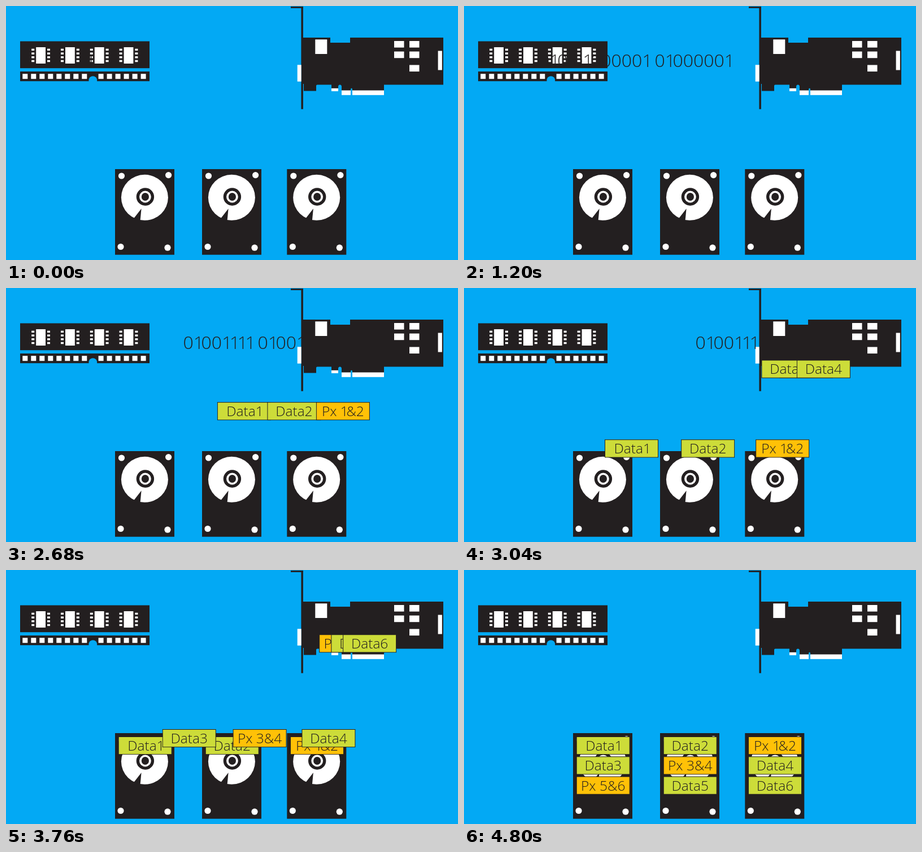
Write an HTML page that moves like this. It is 800 px wide and 450 px high and loops after 10 s.

```html
<!DOCTYPE html>
<html lang="en">
<head>
<meta charset="utf-8">
<title>Parity across three disks</title>
<style>
  html, body { margin: 0; width: 100%; height: 100%; overflow: hidden; background: #03a9f4; }
  svg { display: block; width: 100vw; height: 100vh; }
  .dark { fill: #231f20; }
  .white { fill: #fff; }
  .blue { fill: #03a9f4; }
  text { font-family: "Open Sans", "Noto Sans", sans-serif; font-weight: 300; font-variant-numeric: tabular-nums; fill: #231f20; }
  .one { letter-spacing: -.14em; }
  .bits { font-size: 32px; animation: stream 10s linear infinite; }
  .block { animation: 10s linear infinite; }
  .block rect { fill: #cddc39; stroke: #231f20; stroke-width: 1; }
  .block.parity rect { fill: #ffc107; }
  .block text { font-size: 24.5px; text-anchor: middle; }
  .row0 { animation-name: drop0; }
  .row1 { animation-name: drop1; }
  .row2 { animation-name: drop2; }

  @keyframes stream {
    0% { transform: translate(-401.5px, 108px); }
    35%, 100% { transform: translate(531.8px, 108px); }
  }
  @keyframes drop0 {
    0%, 20.35% { visibility: hidden; transform: var(--from); }
    20.36% { visibility: visible; transform: var(--from); }
    31.86%, 100% { visibility: visible; transform: var(--to); }
  }
  @keyframes drop1 {
    0%, 28.35% { visibility: hidden; transform: var(--from); }
    28.36% { visibility: visible; transform: var(--from); }
    39.86%, 100% { visibility: visible; transform: var(--to); }
  }
  @keyframes drop2 {
    0%, 36.35% { visibility: hidden; transform: var(--from); }
    36.36% { visibility: visible; transform: var(--from); }
    47.86%, 100% { visibility: visible; transform: var(--to); }
  }
</style>
</head>
<body>
<svg id="stage" viewBox="0 0 800 450"></svg>
<script>
const rect = (x, y, w, h, cls = 'white') =>
  `<rect class="${cls}" x="${x}" y="${y}" width="${w}" height="${h}"/>`;
const dot = (x, y, rx, cls = 'white', ry = rx) =>
  `<ellipse class="${cls}" cx="${x}" cy="${y}" rx="${rx}" ry="${ry}"/>`;
const repeat = (n, make) => Array.from({ length: n }, (_, i) => make(i)).join('');
// The digit 1 is set narrower than the other figures
const figures = s => s.replace(/1/g, '<tspan class="one">1</tspan>');

function memory() {
  const chip = i => {
    const x = 53.2 + i * 51.8;
    return rect(x, 73, 16.8, 29) + repeat(4, r => {
      const y = 75.7 + r * 6.7;
      return rect(x - 8, y, 5, 3.4) + rect(x + 19.8, y, 5, 3.4);
    });
  };
  return rect(25, 62.5, 229, 47.7, 'dark') + rect(25, 116, 229, 17.2, 'dark') +
    repeat(4, chip) +
    repeat(8, i => rect(29.3 + i * 15, 120.2, 9, 9)) +
    repeat(6, i => rect(163.6 + i * 15, 120.2, 9, 9)) +
    `<path class="blue" d="M146.5 134v-2.5a7.3 7.3 0 0 1 14.6 0v2.5z"/>`;
}

function card() {
  const body = `M525 56H574V65H609V56H774V139.5H669V150H613V147Q611.5 144 610 147V150H594V143
    Q594 139.5 591 139.5Q588 139.5 588 143V147H576V139.5H551Q549 139.5 549 141.5V150.5H527V138H525Z`;
  return rect(504, 1, 22, 2.8, 'dark') + rect(522.4, 1, 3.5, 181.7, 'dark') +
    `<path class="dark" d="${body}"/>` +
    rect(515.7, 104.3, 6.9, 29.5) + rect(547.3, 59.3, 21, 25.7) +
    [[687, 62], [714, 62], [687, 80.6], [714, 80.6], [714, 104.5]]
      .map(([x, y]) => rect(x, y, 17.5, 11.6)).join('') +
    rect(764.6, 79.5, 7.2, 34) +
    rect(576, 145.8, 12, 5.2) + rect(594, 149.5, 16, 8.3) + rect(613, 149.5, 56, 8.3);
}

const disk = x => `<g transform="translate(${x} 289)">` +
  rect(0, 0, 105, 151.7, 'dark') +
  dot(11.5, 12, 5.6) + dot(94.6, 10.6, 5.6) + dot(10, 137.5, 5.6) + dot(93, 139.2, 5.6) +
  dot(52.4, 50.3, 41.5, 'white', 40.5) +
  '<path class="dark" d="M46.6 70L33 87.5L35 92H44.5Z"/>' +
  dot(53.4, 49, 15.7, 'dark') + dot(53.4, 49, 10.4) + dot(53.4, 49, 6.6, 'dark', 7) + '</g>';

const diskX = [193, 347, 497.3];

function block(label, row, column) {
  const from = `translate(${598 + column * 5}px, 84px)`;
  const to = `translate(${diskX[column] + 6.2}px, ${295.5 + row * 35.3}px)`;
  const parity = label.startsWith('Px') ? ' parity' : '';
  return `<g class="block row${row}${parity}" style="--from:${from};--to:${to}">` +
    `<rect width="94" height="31.2"/><text x="47" y="24.4">${figures(label)}</text></g>`;
}

// Back to front: [label, row, column]
const blocks = [
  ['Data1', 0, 0], ['Data2', 0, 1], ['Px 1&amp;2', 0, 2],
  ['Px 3&amp;4', 1, 1], ['Data3', 1, 0], ['Data4', 1, 2],
  ['Px 5&amp;6', 2, 0], ['Data5', 2, 1], ['Data6', 2, 2]
];

document.getElementById('stage').innerHTML =
  '<clipPath id="gap"><rect x="145" y="70" width="378" height="50"/></clipPath>' +
  memory() + card() + diskX.map(disk).join('') +
  `<g clip-path="url(#gap)"><text class="bits">${figures('01001111 01001010 01000001 01000001')}</text></g>` +
  blocks.map(b => block(...b)).join('');
</script>
</body>
</html>
```
